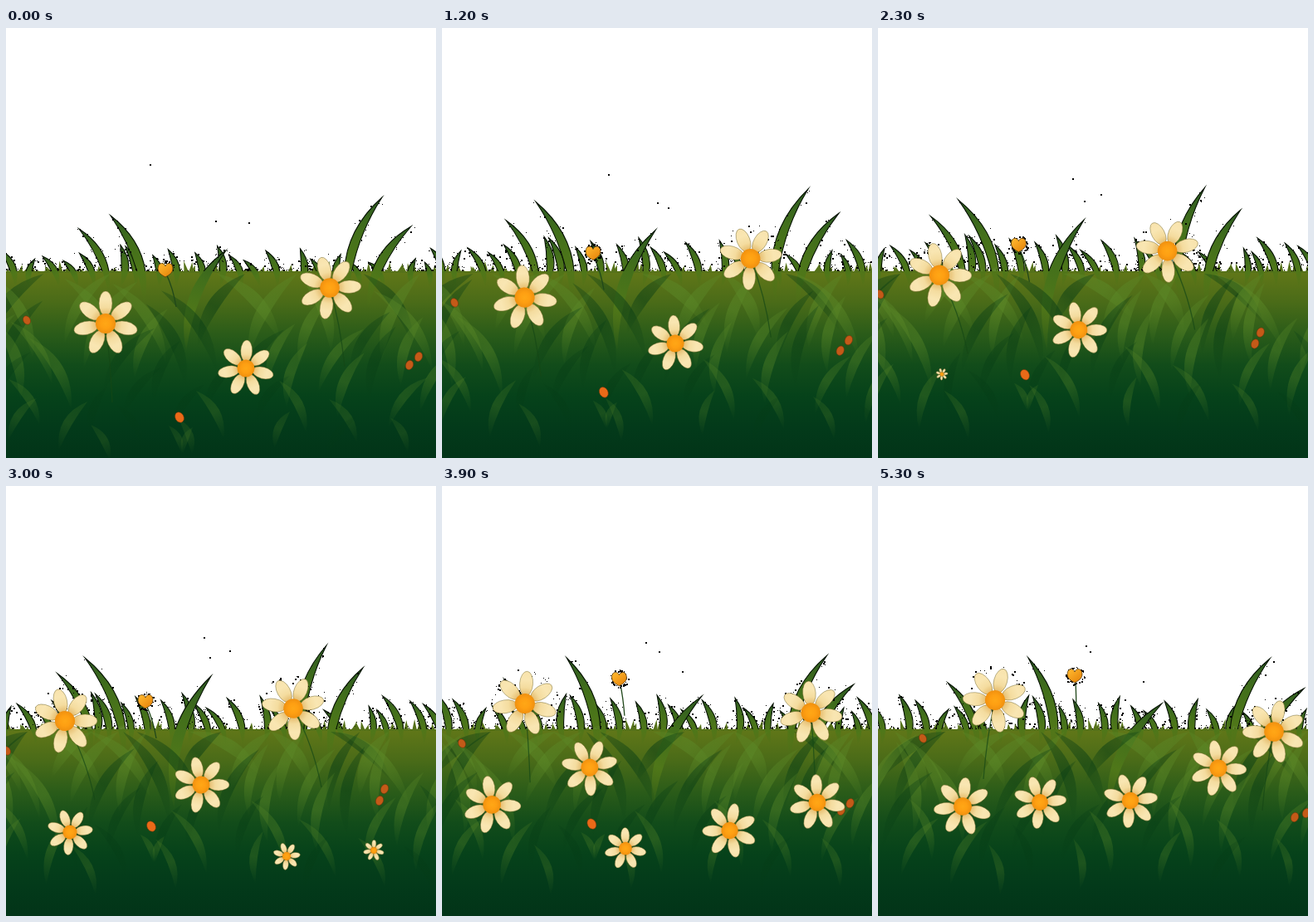
An HTML page with a canvas for the animation above (5400 ms loop, 518 px wide and 518 px high).

```html
<!DOCTYPE html>
<html lang="en">
<head>
<meta charset="utf-8">
<title>Meadow</title>
<style>
  html, body { margin: 0; width: 100%; height: 100%; overflow: hidden; background: #fff; }
  canvas { display: block; width: 100vw; height: 100vh; }
</style>
</head>
<body>
<canvas id="stage" width="518" height="518"></canvas>
<script>
const SIZE = 518, HORIZON = 293, LOOP = 5400, STEP = 100;
const TURN = 3000, END = 5300;
const ctx = document.getElementById('stage').getContext('2d');
let now = 0, tick = 0;

const clamp = u => Math.max(0, Math.min(1, u));
const lerp = (a, b, u) => a + (b - a) * u;
const smooth = (from, to) => { const u = clamp((now - from) / (to - from)); return u * u * (3 - 2 * u); };
const rnd = n => { const v = Math.sin(n * 12.9898) * 43758.5453; return v - Math.floor(v); };

// The meadow drifts left and rises, then swings back to the right
const drift = () => smooth(0, 2700);
const swing = () => smooth(TURN, 4600);
const rise = power => 1 - (1 - clamp(now / TURN)) ** power;

// Where a part is between its start, turning point and end
function place({ path: [a, b, c], slow = 1, lift = 2, lag = [1, 1] }) {
  const d = drift() ** slow, s = swing();
  return {
    x: lerp(a[0], b[0], d) + (c[0] - b[0]) * s ** lag[0],
    y: lerp(a[1], b[1], rise(lift)) + (c[1] - b[1]) * s ** lag[1]
  };
}

function sway(x) {
  return { x: 79 * swing() - lerp(27, 58, clamp(x / SIZE)) * drift(), y: 5 * swing() - 18 * rise(3) };
}

function aboveHorizon(draw) {
  ctx.save();
  ctx.beginPath();
  ctx.rect(0, 0, SIZE, HORIZON);
  ctx.clip();
  draw();
  ctx.restore();
}

function speck(x, y, size = 1) {
  ctx.fillStyle = '#000';
  ctx.fillRect(Math.round(x), Math.round(y), size, size);
}

function gradient(g, ...colors) {
  colors.forEach((c, i) => g.addColorStop(i / (colors.length - 1), c));
  return g;
}

function leaf(tx, ty, rx, ry, w, bend) {
  const dx = tx - rx, dy = ty - ry, len = Math.hypot(dx, dy);
  const b = dx > 0 ? -bend : bend, nx = -dy / len * w, ny = dx / len * w;
  const cx = (tx + rx) / 2 - dy * b, cy = (ty + ry) / 2 + dx * b;
  const shape = new Path2D();
  shape.moveTo(rx, ry);
  shape.quadraticCurveTo(cx - nx, cy - ny, tx, ty);
  shape.quadraticCurveTo(cx + nx, cy + ny, rx, ry);
  return { shape, cx, cy };
}

function tallBlade(tx, ty, rx, ry, w, seed) {
  const { shape, cx, cy } = leaf(tx, ty, rx, ry, w, 0.22);
  ctx.fillStyle = gradient(ctx.createLinearGradient(tx, ty, rx, ry),
    '#2c5a22', '#426f1b', '#4f7719', 'rgba(76,112,22,0)');
  ctx.fill(shape);
  aboveHorizon(() => {
    ctx.strokeStyle = '#061203';
    ctx.lineWidth = 1.1;
    ctx.stroke(shape);
    for (let i = 0; i < 20; i++) {
      const k = seed * 41 + i * 3 + tick * 7.3, u = rnd(k) * 0.85, v = 1 - u;
      const side = rnd(k + 1) < 0.5 ? -1 : 1;
      const off = side * (w * u * v * 2 + 1 + rnd(k + 2) ** 3 * 7);
      speck(v * v * tx + 2 * u * v * cx + u * u * rx + off,
            v * v * ty + 2 * u * v * cy + u * u * ry, rnd(k + 4) < 0.25 ? 2 : 1);
    }
  });
}

function softBlade(tx, ty, rx, ry, w, dark) {
  const alpha = lerp(0.5, 0.2, clamp((ty - 290) / 180));
  const rgb = dark ? '4,58,20' : '92,138,40';
  ctx.fillStyle = gradient(ctx.createLinearGradient(tx, ty, rx, ry),
    `rgba(${rgb},${alpha * 0.6})`, `rgba(${rgb},${alpha})`, `rgba(${rgb},0)`);
  ctx.fill(leaf(tx, ty, rx, ry, w, 0.22).shape);
}

const TALL = [
  { path: [[88, 242], [62, 226], [84, 237]], root: [124, 322], w: 9 },
  { path: [[126, 226], [95, 207], [181, 207]], lift: 4, lag: [0.85, 1], root: [166, 335], w: 11 },
  { path: [[265, 268], [247, 229], [342, 262]], lag: [0.7, 0.6], root: [217, 390], w: 13 },
  { path: [[453, 204], [386, 192], [472, 208]], slow: 2, lift: 4, lag: [0.2, 0.5], root: [412, 335], w: 11 },
  { path: [[488, 239], [430, 219], [513, 244]], slow: 2, lift: 3, lag: [0.45, 0.4], root: [436, 340], w: 11 }
];

const FLOWERS = [
  { path: [[120, 356], [71, 283], [141, 258]], turn: [-90, -103, -74], lift: 1.1, lag: [1.7, 0.35], r: 39, lean: [8, 36, -14] },
  { path: [[390, 313], [346, 268], [477, 296]], turn: [-106, -119, -78], lift: 3, lag: [0.55, 3.3], r: 38, lean: [18, 34, -14] },
  { path: [[289, 410], [235, 360], [110, 330]], turn: [-88, -103, -42], slow: 2.2, lift: 1.8, lag: [1.5, 0.7], r: 34, fades: true }
];

// Flowers that open late and travel along a bow
const BLOOMS = [
  { born: 1800, from: [77, 417], to: [102, 386], bow: [-28, -22], turn: [-110, -84], r: 35 },
  { born: 2150, from: [338, 446], to: [304, 379], bow: [23, -5], turn: [-58, -110], r: 33 },
  { born: 2300, from: [443, 439], to: [410, 340], bow: [23, -20], turn: [-88, -100], r: 34 },
  { born: 2700, from: [222, 460], to: [195, 381], bow: [10, 8], turn: [-113, -57], r: 32 }
];

const HEART = { path: [[192, 291], [168, 259], [237, 228]], lag: [0.8, 0.25] };

const BUDS = [
  { path: [[25, 352], [1, 319], [54, 304]], lag: [1.6, 1], r: 5 },
  { path: [[209, 469], [175, 410], [184, 405]], lift: 1.4, r: 6, leaves: true, fades: true },
  { path: [[486, 406], [450, 379], [502, 399]], slow: 2, r: 5.3 },
  { path: [[497, 396], [456, 365], [516, 394]], slow: 2, r: 5.3 }
];

const SKY = [
  { path: [[173, 164], [238, 182], [250, 192]] },
  { path: [[252, 232], [269, 198], [255, 199]] },
  { path: [[292, 234], [245, 206], [319, 235]] }
];

function drawGround() {
  ctx.fillStyle = '#fff';
  ctx.fillRect(0, 0, SIZE, SIZE);
  ctx.fillStyle = gradient(ctx.createLinearGradient(0, HORIZON, 0, SIZE),
    '#617718', '#4a6b18', '#2b5c19', '#124c1a', '#06421a', '#033a1a', '#023418');
  ctx.fillRect(0, HORIZON, SIZE, SIZE - HORIZON);
}

function drawTufts() {
  for (let i = -25; i < 155; i++) {
    const x0 = i * 4 + rnd(i + 50) * 3, x = x0 + sway(x0).x;
    const h = 1 + rnd(i + 200) ** 4 * 12, tip = x + (rnd(i + 90) - 0.5) * 8;
    ctx.beginPath();
    ctx.moveTo(x - 3, HORIZON + 2);
    ctx.lineTo(tip, HORIZON - h);
    ctx.lineTo(x + 3, HORIZON + 2);
    ctx.fillStyle = '#56721a';
    ctx.fill();
    if (rnd(i + tick * 3.1) < 0.75) speck(tip, HORIZON - h - 1, 1 + (i & 1));
    if (rnd(i + tick * 5.7) < 0.5) speck(x + 2, HORIZON - 1 - rnd(i + 7) * 4);
  }
}

function drawTall() {
  for (let i = -4; i < 24; i++) {
    const x = i * 25 + rnd(i + 11) * 14, s = sway(x), h = 14 + rnd(i + 31) * 24;
    const lean = (rnd(i + 61) - 0.6) * 34;
    tallBlade(x + lean + s.x, HORIZON + 6 - h + s.y * 0.7, x + s.x * 0.9, 312, 5 + h / 10, i + 60);
  }
  TALL.forEach((b, i) => {
    const tip = place(b);
    tallBlade(tip.x, tip.y, b.root[0] + (tip.x - b.path[0][0]) * 0.78, b.root[1], b.w, i);
  });
}

function drawMeadow() {
  const dy = -46 * rise(1.6);
  for (let i = 0; i < 64; i++) {
    const x = (i * 0.618 % 1) * 680 - 90, y = 375 + (i / 64) * 150 + dy * 0.6;
    const h = lerp(110, 45, i / 64) * (0.8 + rnd(i + 5) * 0.4);
    const lean = (rnd(i + 300) < 0.5 ? -1 : 1) * h * (0.3 + rnd(i + 400) * 0.5);
    const dx = sway(x).x * 0.7, ty = Math.max(HORIZON + 3, y - h + dy * 0.4);
    softBlade(x + lean + dx, ty, x + dx * 0.7, y, 6 + h * 0.08, rnd(i + 500) < 0.35);
  }
}

function stem(x, y, x2, y2, color) {
  ctx.beginPath();
  ctx.moveTo(x, y);
  ctx.quadraticCurveTo(lerp(x, x2, 0.7), lerp(y, y2, 0.45), x2, y2);
  ctx.strokeStyle = color;
  ctx.lineWidth = 1.3;
  ctx.stroke();
}

function noiseRing(x, y, r, seed) {
  aboveHorizon(() => {
    for (let i = 0; i < 46; i++) {
      const k = seed * 77 + i * 2 + tick * 4.7, ang = rnd(k) * Math.PI * 2;
      const d = r * (0.8 + rnd(k + 1) * 0.3);
      speck(x + Math.cos(ang) * d, y + Math.sin(ang) * d, 1 + (i & 1));
    }
  });
}

function daisy(x, y, r, degrees) {
  if (r < 3) return;
  noiseRing(x, y, r, r);
  ctx.save();
  ctx.translate(x, y);
  ctx.rotate(degrees * Math.PI / 180);
  ctx.fillStyle = gradient(ctx.createRadialGradient(0, 0, r * 0.25, 0, 0, r),
    '#e3b868', '#f4dc9f', '#f9e6b2', '#f8e3ad');
  ctx.strokeStyle = 'rgba(110,100,40,.55)';
  ctx.lineWidth = 0.8;
  for (let i = 0; i < 7; i++) {
    ctx.beginPath();
    ctx.ellipse(r * 0.62, 0, r * 0.38, r * 0.205, 0, 0, Math.PI * 2);
    ctx.fill();
    ctx.stroke();
    ctx.rotate(Math.PI * 2 / 7);
  }
  ctx.fillStyle = gradient(ctx.createRadialGradient(0, 0, 0, 0, 0, r * 0.31),
    '#ffa716', '#fe9f12', '#f0900f');
  ctx.beginPath();
  ctx.arc(0, 0, r * 0.31, 0, Math.PI * 2);
  ctx.fill();
  ctx.restore();
}

function drawFlowers() {
  for (const f of FLOWERS) {
    const { x, y } = place(f);
    const blend = ([a, b, c]) => lerp(a, b, drift()) + (c - b) * swing();
    if (f.lean) stem(x, y, x + blend(f.lean), y + 95, 'rgba(22,72,22,.7)');
    daisy(x, y, f.fades ? f.r * (1 - smooth(3900, 4600)) : f.r, blend(f.turn));
  }
  for (const { born, from, to, bow, turn, r } of BLOOMS) {
    const u = clamp((now - TURN) / (END - TURN)), arc = 4 * u * (1 - u);
    daisy(lerp(from[0], to[0], u) + bow[0] * arc, lerp(from[1], to[1], u) + bow[1] * arc,
      r * smooth(born, born + 1700), lerp(...turn, u));
  }
}

function drawHeart() {
  const { x, y } = place(HEART);
  stem(x + 1, y + 5, x + lerp(13, 2, swing()), y + 45, '#20471a');
  noiseRing(x, y, 10, 9);
  ctx.save();
  ctx.translate(x, y);
  ctx.beginPath();
  ctx.moveTo(0, 9);
  ctx.bezierCurveTo(-8, 5, -10, 1, -8.5, -4);
  ctx.bezierCurveTo(-7, -9, -1, -8, 0, -4);
  ctx.bezierCurveTo(1, -8, 7, -9, 8.5, -4);
  ctx.bezierCurveTo(10, 1, 8, 5, 0, 9);
  ctx.fillStyle = gradient(ctx.createLinearGradient(-6, -6, 6, 8), '#ffb52c', '#e6850b');
  ctx.fill();
  ctx.strokeStyle = '#5a3a08';
  ctx.lineWidth = 0.8;
  ctx.stroke();
  ctx.restore();
}

function drawBuds() {
  for (const bud of BUDS) {
    const { x, y } = place(bud);
    ctx.globalAlpha = bud.fades ? 1 - smooth(3900, 4600) : 1;
    if (bud.leaves) {
      softBlade(x - 13, y + 10, x + 3, y + 44, 8);
      softBlade(x + 16, y + 12, x + 4, y + 44, 8);
    }
    ctx.beginPath();
    ctx.ellipse(x, y, bud.r * 0.85, bud.r * 1.1, x < 260 ? -0.5 : 0.4, 0, Math.PI * 2);
    ctx.fillStyle = bud.leaves ? '#ea6a18' : '#c45a18';
    ctx.fill();
    ctx.strokeStyle = 'rgba(110,50,10,.7)';
    ctx.lineWidth = 0.8;
    ctx.stroke();
    ctx.globalAlpha = 1;
  }
}

function drawSky() {
  for (const dot of SKY) {
    const { x, y } = place(dot);
    speck(x, y, 2);
  }
}

function paint() {
  drawGround();
  drawSky();
  drawTufts();
  drawTall();
  drawMeadow();
  drawHeart();
  drawBuds();
  drawFlowers();
}

let shown = -1;
const start = performance.now();
function loop() {
  tick = Math.floor((performance.now() - start) % LOOP / STEP);
  if (tick !== shown) {
    shown = tick;
    now = tick * STEP;
    paint();
  }
  requestAnimationFrame(loop);
}
loop();
</script>
</body>
</html>
```
